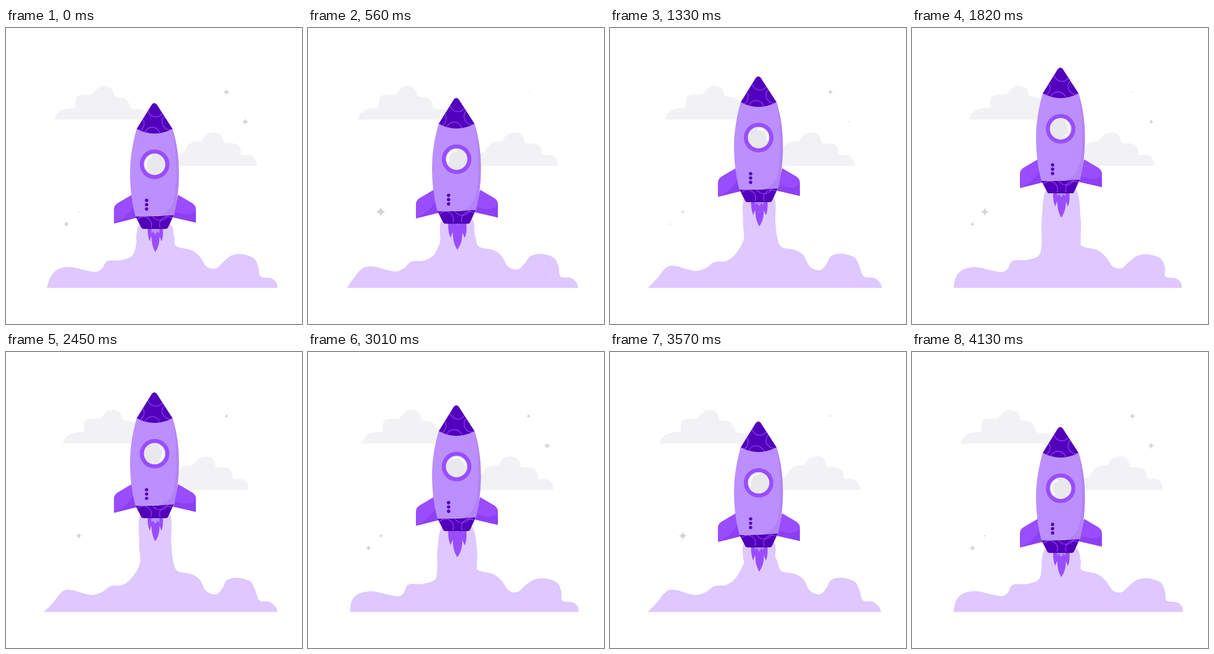
An HTML page for the animation above (4.2 s loop, 480 px wide and 480 px high).

```html
<!DOCTYPE html>
<html lang="en">
<head>
<meta charset="utf-8">
<title>Rocket launch</title>
<style>
html, body { margin: 0; height: 100%; overflow: hidden; background: #fff; }
svg { display: block; width: 100%; height: 100%; }
</style>
</head>
<body>
<svg viewBox="0 0 480 480">
  <defs>
    <path id="noseShape" d="M212 163.500L236.500 124Q240.500 119.500 244.500 124L270 163.500Q241 179 212 163.500Z"/>
    <path id="baseShape" d="M210 305.500Q241 306 272 303.500L263 323Q262 325.500 259 325.500H223Q220 325.500 219 323Z"/>
    <path id="bodyShape" d="M212 163C203 195 200 222 201.500 250C202.500 272 206 291 210 305.500L272 304C276 288 279.500 268 280.200 245C281 215 278 190 270 163Q241 178 212 163Z"/>
    <clipPath id="noseClip"><use href="#noseShape"/></clipPath>
    <clipPath id="baseClip"><use href="#baseShape"/></clipPath>
    <clipPath id="bodyClip"><use href="#bodyShape"/></clipPath>
  </defs>

  <g fill="#f2f1f4">
    <path id="cloudL" d="M79 148.500C80 138 89 132 97 131C103 129 108 131 112 129C114 127 111 117 115 111C120 107 130 109 137 108C144 107 146 95 158 94C170 94 175 101 175 109C176 113 186 110 192 114C199 118 200 124 201 128C204 133 212 131 218 132C226 133 231 140 232 148.500Z"/>
    <path id="cloudR" d="M407 223.500C407 214 402 207 395 206C389 205 383 209 381 203C381 196 379 190 372 188C364 185 354 190 353 184C352 174 346 169 337 169.500C327 170 322 174 319 181C316 186 307 182 301 186C293 190 292 196 289 200C282 206 275 204 270 209C264 213 262 218 261 223.500Z"/>
  </g>
  <g id="stars" fill="#d5d5d9"></g>
  <path id="smoke" fill="#dec8ff"/>

  <g id="rocket">
    <g id="flame">
      <path fill="#994dff" d="M230 320C229 334 231 340 233 346C234 342 235 340 236 338C236 350 239 358 242 363C246 358 249 350 249 338C250 341 251 343 252 346C255 340 255 330 254 320Z"/>
      <path id="core" fill="#bb8ffd" d="M235 320H249.500L248.500 333L245.500 330L242 335L238.500 330L236 333Z"/>
    </g>
    <path fill="#994dff" d="M204 270.500L181 284Q175 288 175 294V317L211 308ZM279 270.500L302 284Q308 288 308 294V315.500L271 307Z"/>
    <path fill="#8d40f3" d="M175 317Q196 308 206 290L211 308ZM308 315.500Q307 302 307 296Q300 306 276 299L271 307Z"/>
    <use href="#bodyShape" fill="#bb8ffd"/>
    <path clip-path="url(#bodyClip)" fill="#b383f6" d="M270 163C277 200 278 245 273 275Q269 298 248 305H290V163Z"/>
    <use href="#noseShape" fill="#5200bb"/>
    <use href="#baseShape" fill="#5200bb"/>
    <g fill="none" stroke="#8b3df0" stroke-width="1.300">
      <g clip-path="url(#noseClip)">
        <circle cx="243" cy="131" r="13"/><circle cx="237" cy="174" r="13"/>
        <circle cx="266" cy="152" r="13"/><circle cx="211" cy="155" r="13"/>
      </g>
      <g clip-path="url(#baseClip)">
        <circle cx="223" cy="319" r="13"/><circle cx="250" cy="298" r="14"/>
        <circle cx="262" cy="319" r="13"/>
        <path stroke="#41009a" stroke-width="2" d="M215 325H268"/>
      </g>
    </g>
    <circle cx="241" cy="221" r="20.700" fill="#e9e8ec" stroke="#994dff" stroke-width="6.500"/>
    <path id="glint" fill="none" stroke="#fff" stroke-width="2.600" stroke-linecap="round" d="M234.500 208.600A14 14 0 0 0 231 230.800"/>
    <g fill="#5200bb">
      <circle cx="228" cy="279.500" r="2.700"/><circle cx="228" cy="286.500" r="2.700"/><circle cx="228" cy="293.500" r="2.700"/>
    </g>
  </g>
</svg>
<script>
const LOOP = 4200, STEP = 70, PUFF = 1050, FLICKER = 350;
const $ = id => document.getElementById(id);
const put = (id, transform) => $(id).setAttribute('transform', transform);
const mix = (a, b, k) => a + (b - a) * k;
const ease = x => x ** 1.8 / (x ** 1.8 + (1 - x) ** 1.8);
// 0..1 wave that peaks at the given time
const wave = (t, peak, period) => (1 + Math.cos((t - peak) / period * 2 * Math.PI)) / 2;

// Smoke outline on both sides of the column: x, y when puffed, x, y when spread
const LEFT = [
  [68, 421.5, 61, 421.5], [71, 403, 75, 408], [82, 392, 92, 388], [104, 388, 107, 386],
  [128, 393, 124, 391], [146, 396, 140, 394], [155, 391, 156, 389], [163, 377, 170, 379.5],
  [186, 376, 188, 378], [206, 369, 203, 367], [209.5, 350, 217, 343]
];
const RIGHT = [
  [274, 345, 271, 338], [276, 354, 278, 355], [300, 360, 300, 360], [314, 371, 314, 369],
  [326, 387, 324, 387], [340, 389, 340, 393], [353, 378, 351, 383], [367, 369, 358, 370],
  [384, 367, 375, 366], [404, 374, 396, 372], [411, 389, 404, 386],
  [411, 403, 408, 403], [428, 406, 424, 405], [436, 413, 434, 413], [437.5, 421.5, 437.5, 421.5]
];

// x, y, smallest and largest radius, time of the peak
const STARS = [[357.5, 104, 1, 5.4, 90], [388, 152, 1, 5.5, 980], [118, 298, 1.4, 8, 600], [98, 318, 1, 5, 980]];
$('stars').innerHTML = STARS.map(() => '<path d="M0-1Q.15-.15 1 0Q.15 .15 0 1Q-.15 .15-1 0Q-.15-.15 0-1Z"/>').join('');

function curve(pts) {
  const at = i => pts[Math.max(0, Math.min(pts.length - 1, i))];
  let d = 'M' + pts[0];
  for (let i = 0; i < pts.length - 1; i++) {
    const [p, a, b, n] = [-1, 0, 1, 2].map(k => at(i + k));
    const c1 = a.map((v, j) => v + (b[j] - p[j]) / 6);
    const c2 = b.map((v, j) => v - (n[j] - a[j]) / 6);
    d += `C${c1} ${c2} ${b}`;
  }
  return d + 'Z';
}

function smoke(t, rise) {
  const spread = wave(t, 350, PUFF), sway = 4 * wave(t, 175, PUFF);
  const shape = ([ax, ay, bx, by]) => [mix(ax, bx, spread), mix(ay, by, spread)];
  const bottom = 325 - rise, mid = (bottom + 348) / 2;
  const right = RIGHT.map(shape);
  right.slice(-4).forEach(p => p[0] += sway);
  return curve([
    ...LEFT.map(shape), [mix(210, 216, spread), mid], [220, bottom - 8],
    [264, bottom - 8], [mix(274, 268, spread), mid], ...right
  ]);
}

function draw(t) {
  const lift = t < 2100 ? ease(t / 2100) : 1 - ease(Math.min(1, (t - 2100) / 2030));
  const rise = 59.5 * lift, burn = 1 - wave(t, 0, FLICKER);
  put('rocket', `translate(0 ${-rise})`);
  put('glint', `rotate(${180 * lift} 241 221)`);
  put('flame', `translate(242 322) scale(${1 + .22 * burn} ${1 + .13 * burn}) translate(-242 -322)`);
  put('core', `translate(0 ${-9 * burn})`);
  put('cloudL', `translate(${14.5 * lift} 0)`);
  put('cloudR', `translate(${-14.5 * lift} 0)`);
  $('smoke').setAttribute('d', smoke(t, rise));
  STARS.forEach(([x, y, low, high, peak], i) => {
    const w = wave(t, peak, PUFF), r = mix(low, high, w * w * (3 - 2 * w));
    $('stars').children[i].setAttribute('transform', `translate(${x} ${y}) scale(${r})`);
  });
}

const start = performance.now();
function tick() {
  const t = (performance.now() - start) % LOOP;
  draw(Math.floor(t / STEP) * STEP);
  requestAnimationFrame(tick);
}
tick();
</script>
</body>
</html>
```
